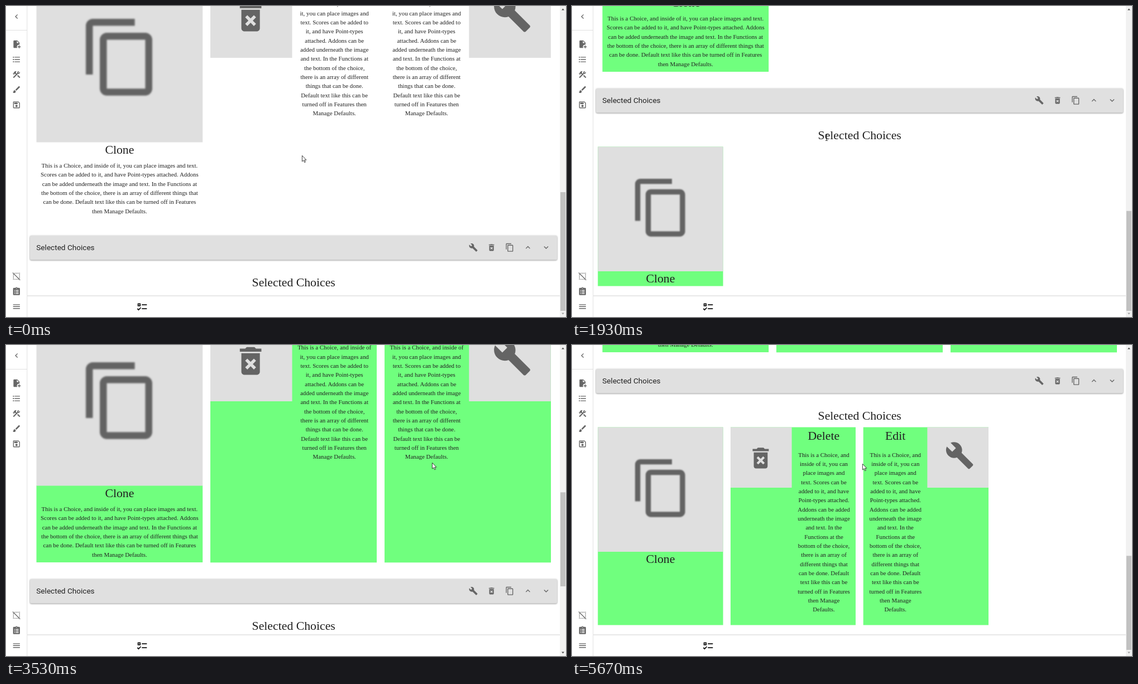
Animation of 1003x558 px, one loop 6540 ms. Source, as an HTML page:

```html
<!DOCTYPE html>
<html lang="en">
<head>
<meta charset="utf-8">
<title>Selected Choices</title>
<style>
  html, body { margin: 0; width: 100%; height: 100%; overflow: hidden; background: #fff; }
  svg { display: block; width: 1003px; height: 558px; }
  text { fill: #212121; white-space: pre; }
  .body, .head { font-family: "Liberation Serif", "Times New Roman", serif; text-anchor: middle; }
  .body { font-size: 10.88px; }
  .head { font-size: 21.78px; }
  .bar text { font: 13.6px Roboto, sans-serif; }
  .bar rect { filter: drop-shadow(0 1.4px 1px rgba(0,0,0,.3)) drop-shadow(0 .5px 1.5px rgba(0,0,0,.16)); }
  .bar use, .side use { fill: #666; fill-rule: evenodd; }
  .art { fill: #646464; fill-rule: evenodd; }
  .soft { filter: url(#soft); }
  .mild { filter: url(#mild); }
  .on { fill: #70ff7e; }
</style>
</head>
<body>
<svg viewBox="0 0 1003 558">
  <defs>
    <filter id="soft"><feGaussianBlur stdDeviation=".27"/></filter>
    <filter id="mild"><feGaussianBlur stdDeviation=".15"/></filter>
    <path id="copy" d="M16 1H4c-1.1 0-2 .9-2 2v14h2V3h12V1zm3 4H8c-1.1 0-2 .9-2 2v14c0 1.1.9 2 2 2h11c1.1 0 2-.9 2-2V7c0-1.1-.9-2-2-2zm0 16H8V7h11v14z"/>
    <path id="trash" d="M6 19c0 1.1.9 2 2 2h8c1.1 0 2-.9 2-2V7H6v12zM8.46 11.88l1.41-1.41L12 12.59l2.12-2.12 1.41 1.41L13.41 14l2.12 2.12-1.41 1.41L12 15.41l-2.12 2.12-1.41-1.41L10.59 14zM15.5 4l-1-1h-5l-1 1H5v2h14V4z"/>
    <path id="wrench" d="M22.7 19l-9.1-9.1c.9-2.3.4-5-1.5-6.9-2-2-5-2.4-7.4-1.3L9 6 6 9 1.6 4.7C.4 7.1.9 10.1 2.9 12.1c1.9 1.9 4.6 2.4 6.9 1.5l9.1 9.1c.4.4 1 .4 1.4 0l2.3-2.3c.5-.4.5-1.1.1-1.4z"/>
    <path id="up" d="M7.41 15.41L12 10.83l4.59 4.58L18 14l-6-6-6 6z"/>
    <path id="down" d="M7.41 8.59L12 13.17l4.59-4.58L18 10l-6 6-6-6z"/>
    <path id="back" d="M15.41 16.58L10.83 12l4.58-4.59L14 6l-6 6 6 6z"/>
    <path id="file" d="M14 2H6a2 2 0 0 0-2 2v16a2 2 0 0 0 2 2h7.8A6 6 0 0 1 20 13.1V8zm-1 7V3.5L18.5 9zM20 15v3h3v2h-3v3h-2v-3h-3v-2h3v-3z"/>
    <path id="list" d="M7 5h14v2H7zM7 11h14v2H7zM7 17h14v2H7zM2.6 4.6h2.8v2.8H2.6zM2.6 10.6h2.8v2.8H2.6zM2.6 16.6h2.8v2.8H2.6z"/>
    <path id="tools" d="M13.78 15.3l6 6 2.11-2.16-6-6zM17.5 10.1c-.39 0-.81-.05-1.14-.19L4.97 21.25l-2.11-2.11 7.41-7.4L8.5 9.96l-.72.7-1.45-1.41v2.86l-.7.7L2.11 9.25l.7-.7h2.81L4.22 7.14l3.56-3.56c1.17-1.17 3.05-1.17 4.22 0L9.89 5.74l1.41 1.4-.71.71 1.79 1.78 1.82-1.88A3.5 3.5 0 0 1 17.5 3.11c.59 0 1.11.14 1.58.42L16.41 6.2l1.5 1.5 2.67-2.67c.28.47.42.97.42 1.6 0 1.92-1.55 3.47-3.5 3.47z"/>
    <path id="brush" d="M20.71 4.63l-1.34-1.34c-.39-.39-1.02-.39-1.41 0L9 12.25 11.75 15l8.96-8.96c.39-.39.39-1.02 0-1.41zM7 14c-1.66 0-3 1.34-3 3 0 1.31-1.16 2-2 2 .92 1.22 2.49 2 4 2 2.21 0 4-1.79 4-4 0-1.66-1.34-3-3-3z"/>
    <path id="save" d="M17 3H5a2 2 0 0 0-2 2v14a2 2 0 0 0 2 2h14a2 2 0 0 0 2-2V7zm2 16H5V5h11.17L19 7.83zM12 12a3 3 0 1 0 0 6 3 3 0 0 0 0-6zM6 6h9v4H6z"/>
    <g id="unselect" fill="none" stroke="#666" stroke-width="2">
      <path d="M7 4h2m2 0h2m2 0h2m2 0h1v1m0 2v2m0 2v2m0 2v2M4 7v2m0 2v2m0 2v2m0 2v1h1m2 0h2m2 0h2m2 0h2"/>
      <path d="M2 2.5L21.5 22" stroke-width="1.8"/>
    </g>
    <path id="board" d="M19 3h-4.2a3 3 0 0 0-5.6 0H5a2 2 0 0 0-2 2v15a2 2 0 0 0 2 2h14a2 2 0 0 0 2-2V5a2 2 0 0 0-2-2zM12 3a1 1 0 1 1 0 2 1 1 0 0 1 0-2zM6.5 8.5h2.2v2.2H6.5zM10.5 8.5h7v2.2h-7zM6.5 12.5h2.2v2.2H6.5zM10.5 12.5h7v2.2h-7zM6.5 16.5h2.2v2.2H6.5zM10.5 16.5h7v2.2h-7z"/>
    <path id="menu" d="M3 6h18v2H3zM3 11h18v2H3zM3 16h18v2H3z"/>
  </defs>

  <g id="page"></g>

  <g>
    <path fill="#fff" d="M38 519.5h954V558H38z"/>
    <path fill="#000" opacity=".09" d="M38 519h954v2H38z"/>
    <g fill="none" stroke="#111" stroke-width="1.8">
      <path d="M236.6 534.3h3.6v3.6h-3.6zM243.3 536.2h9M243.3 543.2h9M235.3 543l2.2 2.2 4-4.2"/>
    </g>
  </g>

  <g class="side" id="side">
    <path fill="#fff" d="M0 0h38v558H0z"/>
    <path fill="#e0e0e0" d="M37.3 0h1v558h-1zM0 43h38v.9H0z"/>
  </g>

  <path fill="#f1f1f1" d="M992 0h11v558h-11z"/>
  <path fill="#505050" d="M995 7.5l2.5-3 2.5 3z"/>
  <path id="end" d="M995 550.5l2.5 3 2.5-3z"/>
  <rect id="thumb" x="993" width="9" fill="#c1c1c1"/>

  <g id="cursor">
    <path id="arrow" fill="#fff" stroke="#111" stroke-width=".8" d="M.4.4V11l2.5-2.2 1.8 3.9 1.7-.8-1.8-3.7h3.3z"/>
    <path id="beam" fill="none" stroke="#111" stroke-width=".9" d="M-2-5.5h1.5L0-5l.5-.5H2M-2 5.5h1.5L0 5l.5.5H2M0-5V5"/>
  </g>
</svg>
<script>
const $ = id => document.getElementById(id);
const words = ('This is a Choice, and inside of it, you can place images and text. Scores can be added to it, ' +
  'and have Point-types attached. Addons can be added underneath the image and text. In the Functions at ' +
  'the bottom of the choice, there is an array of different things that can be done. Default text like this ' +
  'can be turned off in Features then Manage Defaults.').split(' ');

// Words on each line, one digit in base 16 per line
const WIDE = 'ebcdd3', MID = '7664446565652', SLIM = '553452434345345421';

const rect = (x, y, w, h, attrs) => `<rect x="${x}" y="${y}" width="${w}" height="${h}" ${attrs}/>`;
const icon = (id, x, y, s = .6805, cls = '') =>
  `<use href="#${id}" class="${cls}" transform="translate(${x} ${y}) scale(${s})"/>`;
const mid = (id, x, y) => icon(id, x - 8.17, y - 8.17);
const label = (str, x, y, cls) => `<text class="${cls}" x="${x}" y="${y}">${str}</text>`;
const para = (x, y, split) => {
  let n = 0;
  return [...split].map((c, i) =>
    label(words.slice(n, n += parseInt(c, 16)).join(' '), x, y + i * 16.33, 'body')).join('');
};
const green = (id, x, y, w, h) => rect(x, y, w, h, `class="on" id="${id}"`);

// Grey picture with its icon, sized from the full-width layout
const art = (id, x, y, w, h, full, dx, dy, s, cls) => {
  const f = w / full;
  return rect(x, y, w, h, 'fill="#dfdfdf"') + icon(id, x + dx * f, y + dy * f, s * f, 'art ' + cls);
};
const copyArt = (x, y, w, h) => art('copy', x, y, w, h, 298, 76, 70, 6.27, 'soft');
const trashArt = (x, y, w, h) => art('trash', x, y, w, h, 146.5, 39, 41, 2.76, 'mild');
const wrenchArt = (x, y, w, h) => art('wrench', x, y, w, h, 146.5, 42, 32.5, 2.94, 'mild');

$('page').innerHTML =
  green('cloneOn', 54.5, 244, 297.7, 138) + copyArt(54.5, -53.3, 297.7, 297.8) +
  label('Clone', 203.4, 265, 'head') + para(203.4, 290, WIDE) +
  green('deleteOn', 366, -60, 298, 442.3) + trashArt(366, -53.5, 146.5, 146.5) + para(588.2, .3, MID) +
  green('editOn', 678, -60, 298, 442.3) + wrenchArt(829.3, -53.5, 146.5, 146.5) + para(753.4, .3, MID) +
  '<g class="bar">' + rect(43, 412, 944, 43.5, 'rx="2.5" fill="#e0e0e0"') +
  '<text x="54.3" y="438">Selected Choices</text>' +
  ['wrench', 'trash', 'copy', 'up', 'down'].map((id, i) => mid(id, 837 + i * 32.6, 433.3)).join('') + '</g>' +
  label('Selected Choices', 515.2, 503, 'head') +
  '<g id="pick1">' + green('pickBase', 46.3, 516.5, 224.3, 250) + copyArt(46.3, 516.5, 224.3, 223.5) +
  label('Clone', 158.4, 760, 'head') + '</g>' +
  '<g id="pick2">' + green('', 284, 516.5, 224, 355) + trashArt(284, 516.5, 109.6, 108.5) +
  label('Delete', 450.8, 539.3, 'head') + para(451, 569.7, SLIM) + '</g>' +
  '<g id="pick3">' + green('', 521.7, 516.5, 224.3, 355) +
  label('Edit', 579.2, 539.3, 'head') + para(579.3, 569.7, SLIM) + '</g>' +
  '<g id="pickArt">' + wrenchArt(636.4, 516.5, 109.6, 108.5) + '</g>';

$('side').innerHTML += [['back', 19], ['file', 68.5], ['list', 96], ['tools', 123], ['brush', 150],
  ['save', 177.3], ['unselect', 485], ['board', 512], ['menu', 539.3]]
  .map(([id, y]) => mid(id, 18.8, y)).join('');

// Keys are in ticks of 1/15 s
const LOOP = 6540;
const PICK = { clone: 18, delete: 45, edit: 53, art: 61 };
const SCROLL = [[0, 0], [25, 0], [29, -264], [36, -264], [43, 8], [54, 8], [57, -60], [59, -60], [60, -174.5], [61, -369]];
const MOUSE = [[0, 530, 268], [9, 517, 238], [12, 517, 238], [17, 330, 216], [20, 334, 218], [25, 431, 247],
  [29, 456, 236], [31, 462, 235], [32, 462, 235], [42, 519.5, 231], [46, 590, 222], [52, 763, 211], [64, 763, 211],
  [67, 756, 213], [72, 756, 213], [77, 650, 210], [82, 527, 212], [85, 520, 213]];

const linear = u => u;
const smooth = u => u * u * (3 - 2 * u);
function sample(keys, k, ease) {
  const i = keys.findIndex(key => key[0] > k);
  if (i < 0) return keys[keys.length - 1].slice(1);
  const a = keys[i - 1], b = keys[i], u = ease((k - a[0]) / (b[0] - a[0]));
  return a.slice(1).map((v, j) => v + (b[j + 1] - v) * u);
}
const show = (id, on) => $(id).setAttribute('visibility', on ? 'visible' : 'hidden');

function draw(now) {
  const k = Math.floor(((now % LOOP) + 4) * 15 / 1000);
  const [off] = sample(SCROLL, k, smooth);
  const [x, y] = sample(MOUSE, k, linear);
  const clone = k >= PICK.clone, del = k >= PICK.delete, edit = k >= PICK.edit;

  $('page').setAttribute('transform', `translate(0 ${off})`);
  show('cloneOn', clone); show('pick1', clone); show('pickBase', clone);
  show('deleteOn', del); show('pick2', del);
  show('editOn', edit); show('pick3', edit);
  show('pickArt', k >= PICK.art);
  $('pickBase').setAttribute('height', del ? 355 : 250);

  const extra = del ? 369 : clone ? 264 : 0;
  const total = 1404 + extra;
  $('thumb').setAttribute('y', 11 + 536 * (846 - off) / total);
  $('thumb').setAttribute('height', 536 * 558 / total);
  $('end').setAttribute('fill', off <= -extra ? '#a3a3a3' : '#505050');

  const overText = x > 441 && x < 590 && y > 485 + off && y < 511 + off;
  show('beam', overText);
  show('arrow', !overText);
  $('cursor').setAttribute('transform', `translate(${x} ${y})`);
}

const start = performance.now();
function tick() {
  draw(performance.now() - start);
  requestAnimationFrame(tick);
}
tick();
</script>
</body>
</html>
```
